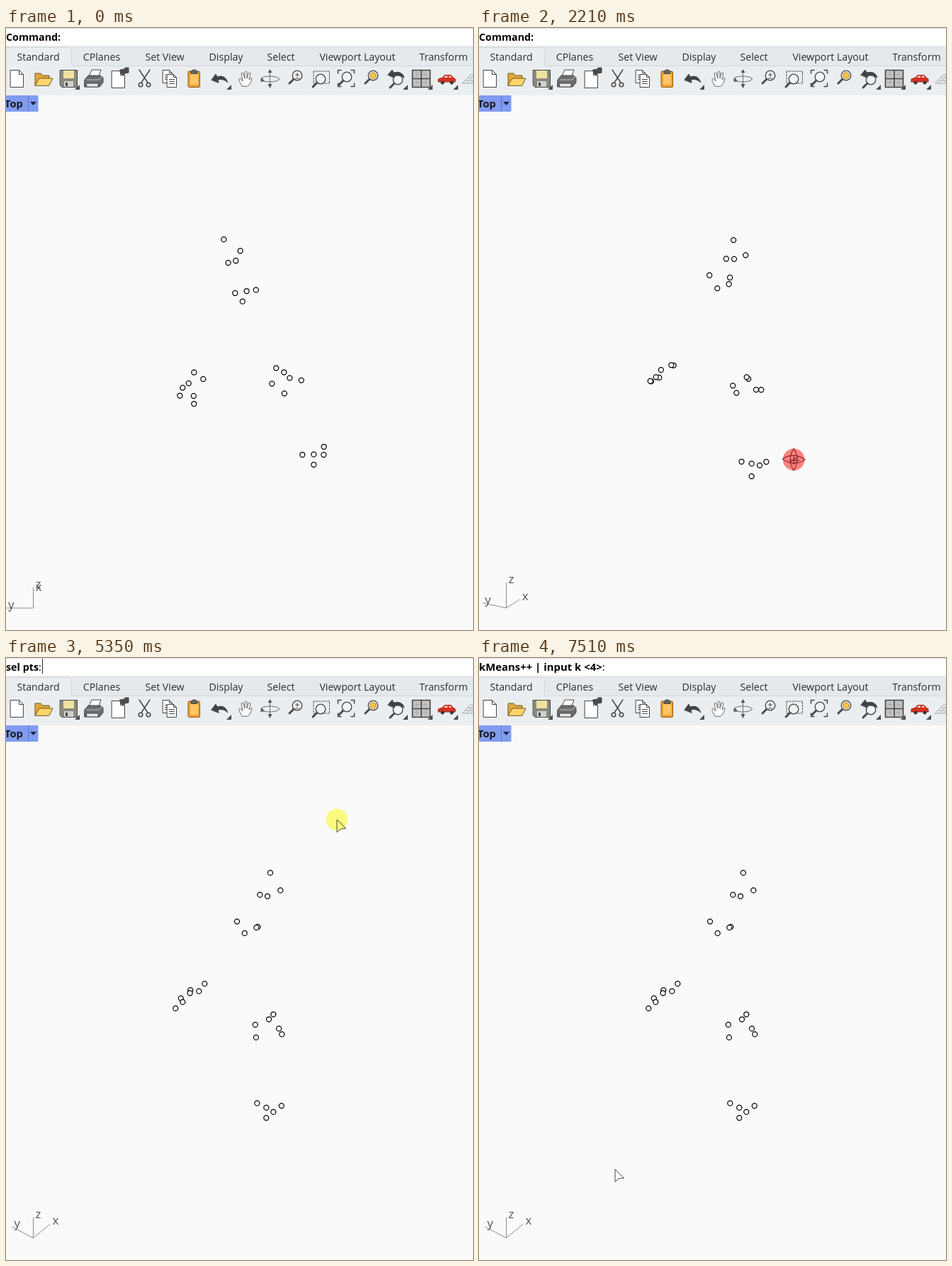
Write an HTML page that moves like this. It is 659x849 px and loops after 8000 ms.

```html
<!DOCTYPE html>
<html lang="en">
<head>
<meta charset="utf-8">
<title>Point clusters</title>
<style>
html, body { margin: 0; width: 100%; height: 100%; overflow: hidden; background: #fafafa; }
svg { display: block; width: 659px; height: 849px; font-family: "Open Sans", "Noto Sans", sans-serif; }
.tabs { font-size: 14.2px; fill: #2b2f36; text-anchor: middle; }
.prompt { font-size: 14.3px; fill: #000; }
.bold { font-weight: 700; }
.axes { font-size: 17px; fill: #555; }
.axes line { stroke: #8c8c8c; }
.dots circle { fill: #fff; stroke: #000; stroke-width: 1.25; }
.dots.picked circle { stroke: #ff0; }
.icons { stroke: #454545; fill: none; stroke-linejoin: round; stroke-linecap: round; }
#glow { mix-blend-mode: multiply; }
</style>
</head>
<body>
<svg viewBox="0 0 659 849">
  <defs>
    <path id="page" d="M0 0H12L18 6V24H0ZM12 0V6H18" fill="#fff"/>
    <path id="sheet" d="M0 0H9L13 4V18H0ZM9 0V4H13M3 7H10M3 10H10M3 13H10" fill="#fff"/>
    <g id="lens">
      <path d="M-5 5L-11 11" stroke="#4a4a4a" stroke-width="3"/>
      <circle r="6.8" fill="#f1f4f6" stroke-width="1.3"/>
    </g>
    <path id="more" d="M0 -7V0H-7Z" fill="#4c4c4c" stroke="none"/>
  </defs>

  <rect width="659" height="849" fill="#fafafa"/>
  <rect width="659" height="25" fill="#fff"/>
  <rect width="659" height="1" fill="#dcdcec"/>
  <rect y="25" width="659" height="70" fill="#ebeef1"/>
  <rect y="25" width="659" height="28" fill="#e6e9ec"/>
  <path d="M0 27.5H87Q92.5 27.5 92.5 33V53.5H659" fill="none" stroke="#d2d6db"/>
  <path d="M0 28H87Q92 28 92 33V54H0Z" fill="#ebeef1"/>

  <g class="tabs">
    <text x="45.5" y="46">Standard</text>
    <text x="135" y="46">CPlanes</text>
    <text x="224" y="46">Set View</text>
    <text x="310.5" y="46">Display</text>
    <text x="388" y="46">Select</text>
    <text x="496" y="46">Viewport Layout</text>
    <text x="617.5" y="46">Transform</text>
  </g>

  <g class="icons">
    <use href="#page" x="6.5" y="59.5"/>
    <g stroke="#6f571f">
      <path d="M41 81V64H49L51 67H61V71" fill="#e0a83c"/>
      <path d="M41 81L47 71H66L61 81Z" fill="#ffd56b"/>
    </g>
    <path d="M76.5 59.5H100.5V83.5H79L76.5 81Z" fill="#8a8b80"/>
    <path d="M81 60H96V71H81Z" fill="#efe3a0" stroke="none"/>
    <path d="M82 75H95V83H82Z" fill="#d0d2d0" stroke="none"/>
    <path d="M84 77H87V82H84Z" fill="#444" stroke="none"/>
    <path d="M117 68L121 59H134L131 68Z" fill="#fff"/>
    <path d="M111 73L116 67H133L137 70V77L132 83H111Z" fill="#6a6d70"/>
    <path d="M114 78H130V83H114Z" fill="#e8e8e8"/>
    <path d="M114 73H131L136 69" stroke="#c4c4c4"/>
    <use href="#page" x="149.5" y="60.5"/>
    <path d="M161 59L167 58 168 56H173V63L168 64 165 66 162 64Z" fill="#4a4a4a"/>
    <path d="M188 59L200 77M203 59L191 77" stroke-width="1.5"/>
    <circle cx="190" cy="80" r="2.8" stroke-width="1.5"/>
    <circle cx="201" cy="80" r="2.8" stroke-width="1.5"/>
    <use href="#sheet" x="221.5" y="59.5"/>
    <use href="#sheet" x="227.5" y="65.5"/>
    <rect x="257" y="61" width="16.500" height="22.500" rx="1.500" fill="#f0a22e" stroke="#8a5a18"/>
    <rect x="260" y="65" width="11" height="15" fill="#ffc566" stroke="none"/>
    <path d="M261 64V61L264 59H267L270 61V64Z" fill="#666"/>
    <path d="M290 73L296 65 298 69Q309 65 313 77Q307 71 299 73L300 77Z" fill="#3f4347"/>
    <g stroke="#6a6a6a">
      <path d="M333 82Q328 74 329 72Q331 70 334 75L332 64Q333 62 335 64L337 71V62Q338.500 60 340 62V71L342 64Q344 62 345 64L343 73Q346 69 347 71Q346 79 341 82Z" fill="#fafafa"/>
      <ellipse cx="372.500" cy="72" rx="13" ry="4"/>
      <path d="M372.500 60V82"/>
    </g>
    <path d="M369.500 63L372.500 58 375.500 63ZM361 70L359 76 365 75ZM369.500 79L372.500 85 375.500 79Z" fill="#555" stroke="none"/>
    <use href="#lens" x="411" y="67"/>
    <path d="M408.500 66H413.500M411 63.500V68.500M408.500 71H413.500"/>
    <rect x="434" y="61" width="22.500" height="17" stroke-dasharray="2 2"/>
    <use href="#lens" x="444" y="72"/>
    <path d="M468.500 64V59.500H473M487 59.500H491.500V64M468.500 78V82.500H473M487 82.500H491.500V78" stroke-width="1.5"/>
    <use href="#lens" x="481" y="69"/>
    <use href="#lens" x="518" y="67"/>
    <circle cx="518" cy="67" r="4.300" fill="#f9c440" stroke="#b9862a"/>
    <use href="#lens" x="553" y="73"/>
    <path d="M539 66L545 59 547 63Q559 60 562 70Q556 66 548 67L548 70Z" fill="#3f4347"/>
    <path d="M573.500 59.500H598.500V83.500H573.500ZM586 59.500V83.500M573.500 71.500H598.500" fill="#c2c3c2" stroke="#444" stroke-width="1.6"/>
    <path d="M580 63V68M577 65.500H583M592 63V68M589 65.500H595M580 74V80M577 77H583M592 74V80M589 77H595" stroke="#aaa"/>
    <path d="M610 75V72L616 70 619 66.500H628L631 70 634 72V76H610Z" fill="#d8321f" stroke="#a32215"/>
    <path d="M618 70L620 67.500H623V70ZM625 70V67.500H627L629 70Z" fill="#f4d9d4" stroke="none"/>
    <circle cx="616" cy="77" r="2.200" fill="#333"/><circle cx="629" cy="77" r="2.200" fill="#333"/>
    <path d="M644 78L655 66H668M648 74H662M652 70H662M644 78H662M650 78L661 66M656 78L664 69" stroke="#aaa"/>
    <use href="#more" x="104" y="87"/><use href="#more" x="318" y="87"/><use href="#more" x="567" y="87"/>
    <use href="#more" x="602" y="87"/><use href="#more" x="638" y="87"/>
  </g>

  <rect y="95" width="45.500" height="23" rx="1" fill="#809cf0"/>
  <path d="M31.500 95V118" stroke="#5d74bd"/>
  <path d="M34 104H43L38.500 109Z" fill="#1d2440"/>
  <text x="-2" y="112" font-size="14.7" class="bold" fill="#1a1a22">Top</text>

  <text class="prompt" id="prompt" x="0" y="17.500"><tspan class="bold" id="words"></tspan><tspan id="colon"></tspan></text>
  <rect id="caret" y="1" width="1" height="21" fill="#2a2340"/>

  <g class="axes" id="axes"></g>
  <rect id="box" fill="#eceff9" stroke="#4b4335" stroke-width="1.3" stroke-dasharray="5 3"/>
  <g class="dots" id="dots"></g>

  <path id="arrow" d="M0 0V18L5 13.200 12.500 12.500Z" fill="#fff" stroke="#444"/>
  <g id="orbit" fill="none" stroke="#8a4646" stroke-width="1.1">
    <path d="M-16 -1Q0 -11 16 0Q0 11 -16 -1ZM0 -15.500Q10 0 0 15.500Q-10 0 0 -15.500Z"/>
    <path d="M-6 5L2 -2H6M0 -6V5M-6 1H8M-1 7L4 3"/>
  </g>
  <circle id="glow" r="15.300"/>
</svg>

<script>
const LOOP = 8000, STEP = 68.1, RAD = Math.PI / 180;
const CX = 329.5, CY = 480, TILT = 41.3, TURN = 38.6;
const $ = id => document.getElementById(id);
const make = (tag, parent) =>
  parent.appendChild(document.createElementNS('http://www.w3.org/2000/svg', tag));

// Each point: x in the opening view, then x and y in the closing view.
const views = [
  [307, 372.6, 302.7], [330.3, 387, 327.5], [313.3, 358, 333.7], [324, 368.7, 335.8],
  [323, 325.7, 371.4], [339.3, 355, 379], [352.5, 353, 380], [333.5, 336.4, 388],
  [265, 280, 459.2], [278, 272, 469.7], [257.5, 260, 468.2], [249, 259.3, 472.3],
  [245, 246.5, 479.6], [264.5, 249, 485], [265, 239, 494],
  [381, 377, 502.3], [392, 370.7, 509.3], [400, 384.8, 522.5], [416.5, 389, 530.5],
  [375, 351.5, 517], [392.5, 352.6, 535],
  [448.3, 388.5, 631.4], [418, 354, 627.7], [434, 367, 634], [448, 377, 640], [434, 367, 648.4]
];

// Time, turn, tilt, pointer x, pointer y while orbiting.
const orbitKeys = [
  [710, 0, TILT, 502, 630], [1120, -27.2, 18, 549, 586], [1300, -29, 6, 553, 566],
  [1470, -24, -8, 540, 542], [1680, -4, -24, 506, 516], [1820, 6, -29, 488, 510],
  [2210, 30.2, 22, 444, 609], [2410, 38, 40, 437, 629], [2480, TURN, TILT, 436, 631]
];

const prompts = [
  [0, 'Command:', '', 79, 14.3],
  [4220, 'sel pts', ':', 51, 14.3],
  [6240, 'sel pts. Press Enter when done', ':', 227, 14.3],
  [6950, 'kMeans++ | input k <4>', ':', 181, 14.9]
];
const caretOn = [[240, 1540], [2410, 3270], [4090, 4880], [5350, 5900], [6300, 7510]];

// Rebuild 3D positions from the two views.
const sT = Math.sin(TURN * RAD), cT = Math.cos(TURN * RAD);
const sE = Math.sin(TILT * RAD), cE = Math.cos(TILT * RAD);
const points = views.map(([xa, xb, yb]) => {
  const y = CX - xa, x = (xb - CX + y * cT) / sT;
  return [x, y, (CY - yb - (x * cT + y * sT) * sE) / cE];
});

function project([x, y, z], turn, tilt) {
  const s = Math.sin(turn * RAD), c = Math.cos(turn * RAD);
  return [x * s - y * c,
    -(x * c + y * s) * Math.sin(tilt * RAD) - z * Math.cos(tilt * RAD)];
}

const snap = (t, from) => from + Math.floor((t - from) / STEP + 0.02) * STEP;
const within = (t, a, b) => t >= a && t < b;
const mix = (a, b, k) => a + (b - a) * k;

// Smooth curve through the keys.
function curve(keys, t) {
  const last = keys.length - 1;
  if (t <= keys[0][0]) return keys[0].slice(1);
  if (t >= keys[last][0] - 2) return keys[last].slice(1);
  let i = 0;
  while (keys[i + 1][0] < t) i++;
  const p = keys[i], q = keys[i + 1], d = q[0] - p[0], u = (t - p[0]) / d;
  const slope = (n, j) => n === 0 || n === last ? 0 :
    (keys[n + 1][j] - keys[n - 1][j]) / (keys[n + 1][0] - keys[n - 1][0]) * d;
  const ease = u * u * (3 - 2 * u);
  return [1, 2, 3, 4].map(j => mix(p[j], q[j], ease) +
    slope(i, j) * u * (1 - u) ** 2 - slope(i + 1, j) * u * u * (1 - u));
}

function glide(t, t0, t1, a, b) {
  const u = Math.min(1, Math.max(0, (snap(t, t0) - t0) / (t1 - t0)));
  const k = u * u * (3 - 2 * u);
  return [mix(a[0], b[0], k), mix(a[1], b[1], k)];
}

function pointer(t) {
  if (t < 240) return null;
  if (t < 710) return glide(t, 240, 376, [520, 655], [502, 630]);
  if (t < 2680) return [436, 631];
  if (t < 2740) return [478, 606];
  if (t < 4150) return null;
  if (t < 4620) return glide(t, 4150, 4350, [646, 831], [454, 389]);
  if (t < 5350) return glide(t, 4552, 5150, [454, 389], [467, 228]);
  if (t < 6240) return glide(t, 5350, 6095, [467, 228], [189.5, 721]);
  return [192, 721];
}

const dots = points.map(() => {
  const c = make('circle', $('dots'));
  c.setAttribute('r', 3.5);
  return c;
});
const axes = ['x', 'y', 'z'].map((name, i) => {
  const line = make('line', $('axes')), label = make('text', $('axes'));
  line.setAttribute('x1', 38.5);
  line.setAttribute('y1', 818);
  label.textContent = name;
  return { line, label, dir: [0, 1, 2].map(n => n === i ? 38.4 : 0) };
});

function set(el, attrs) {
  for (const k in attrs) el.setAttribute(k, attrs[k]);
}
function place(el, pos) {
  el.style.display = pos ? '' : 'none';
  if (pos) el.setAttribute('transform', `translate(${pos[0]} ${pos[1]})`);
}

function draw(t) {
  const [turn, tilt, bx, by] = curve(orbitKeys, snap(t, 710));
  points.forEach((p, i) => {
    const [x, y] = project(p, turn, tilt);
    set(dots[i], { cx: CX + x + 0.3, cy: CY + y + 0.2 });
  });
  $('dots').classList.toggle('picked', within(t, 6240, 6950));

  for (const { line, label, dir } of axes) {
    const [x, y] = project(dir, turn, tilt);
    set(line, { x2: 38.5 + x, y2: 818 + y });
    set(label, { x: 41.5 + x, y: 819 + y });
  }

  const [, words, colon, caretX, size] = prompts.filter(p => t >= p[0]).pop();
  $('words').textContent = words;
  $('colon').textContent = colon;
  $('prompt').style.fontSize = size + 'px';
  set($('caret'), { x: caretX });
  $('caret').style.display = caretOn.some(([a, b]) => within(t, a, b)) ? '' : 'none';

  const orbiting = within(t, 710, 2475), dragging = within(t, 5350, 6240);
  const pos = orbiting ? [bx, by] : pointer(t);
  place($('arrow'), orbiting ? null : pos);
  place($('orbit'), orbiting ? pos : null);

  const right = orbiting || within(t, 6690, 6950);
  place($('glow'), right || dragging ? pos : null);
  $('glow').setAttribute('fill', right ? '#ff8585' : '#ffff82');

  const box = dragging && t >= 5415;
  $('box').style.display = box ? '' : 'none';
  if (box) {
    const x = pos[0] + 1;
    set($('box'), { x, y: 228, width: Math.max(0, 467.5 - x), height: Math.max(0, pos[1] - 228) });
  }
}

const start = performance.now();
function tick() {
  draw((performance.now() - start) % LOOP);
  requestAnimationFrame(tick);
}
tick();
</script>
</body>
</html>
```
